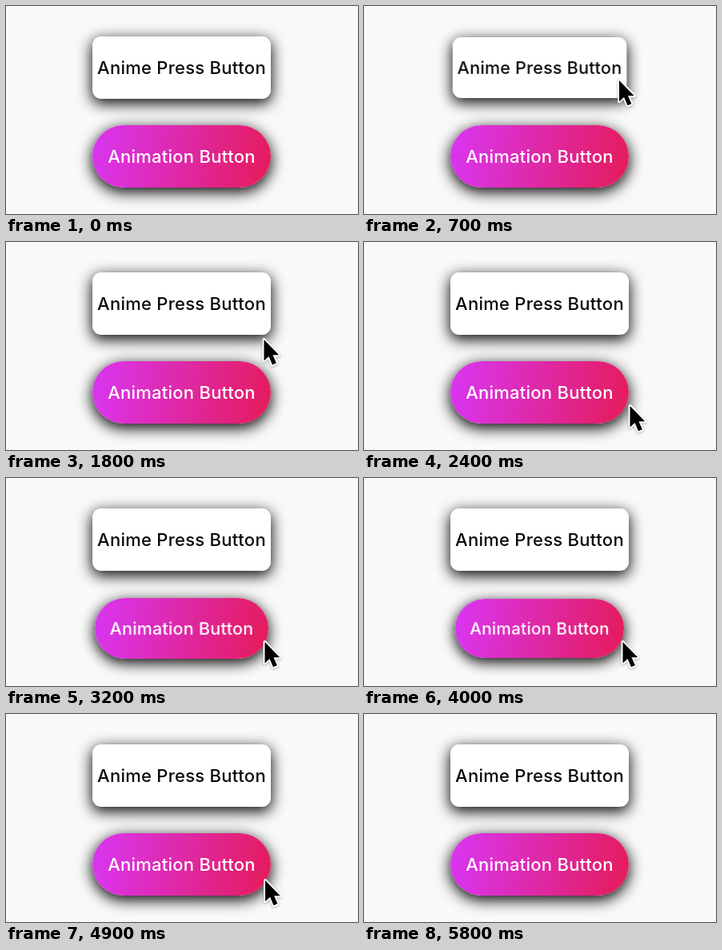
Recreate the animation shown at these times as an HTML page. Size 440 by 260 pixels, loop 6.1 s.

```html
<!DOCTYPE html>
<html lang="en">
<head>
<meta charset="utf-8">
<title>Press buttons</title>
<style>
html, body { margin: 0; width: 100%; height: 100%; overflow: hidden; background: #f9f9f9; }
.button {
  position: absolute; left: 107.5px; width: 223px; height: 78px;
  font: 500 22px/78px Inter, Roboto, sans-serif; letter-spacing: .25px;
  text-align: center; white-space: nowrap;
  box-shadow: 0 5px 18px 1px rgba(0, 0, 0, .95);
  will-change: transform;
}
#plain { top: 37.5px; border-radius: 11px; background: #fff; color: #0a0a0a; }
#pill {
  top: 148.5px; border-radius: 39px; color: #fff;
  background: linear-gradient(100deg, #d936f4, #e51b59);
}
#cursor { position: absolute; left: 0; top: 0; overflow: visible; filter: drop-shadow(0 1px 1.5px rgba(0, 0, 0, .3)); }
#cursor path { stroke: #fff; stroke-width: 3.6; stroke-linejoin: round; paint-order: stroke; }
</style>
</head>
<body>
<div class="button" id="plain">Anime Press Button</div>
<div class="button" id="pill">Animation Button</div>
<svg id="cursor" width="20" height="32"><path transform="scale(1.1)" d="M0 0V24L5.5 19 9.5 28.5 14 26.5 10 17.5H17Z"/></svg>
<script>
const LOOP = 6100, STEP = 100;
const plain = document.getElementById("plain");
const pill = document.getElementById("pill");
const cursor = document.getElementById("cursor");

// Cursor stops: time, x, y
const stops = [
  [100, 370, 72], [500, 319, 93],
  [1600, 319, 93], [2200, 332.5, 205],
  [2400, 332.5, 205], [2600, 323.5, 205],
  [4800, 323.5, 205], [5200, 327, 224]
];

const ease = p => p * p * (3 - 2 * p);

function place(t) {
  const i = stops.findIndex(s => t < s[0]);
  if (i < 1) return null;
  const [a, b] = [stops[i - 1], stops[i]];
  const p = ease((t - a[0]) / (b[0] - a[0]));
  return [a[1] + (b[1] - a[1]) * p, a[2] + (b[2] - a[2]) * p];
}

// Scale during a run of equal presses
function press(t, start, length, count, depth) {
  const n = (t - start) / length;
  return n > 0 && n < count ? 1 - depth * Math.sin(Math.PI * (n % 1)) : 1;
}

function draw(now) {
  const t = Math.floor(now % LOOP / STEP) * STEP;
  plain.style.transform = `scale(${press(t, 650, 640, 1, .1)})`;
  pill.style.transform = `scale(${press(t, 2780, 500, 4, .055)})`;
  const at = place(t);
  cursor.style.display = at ? "block" : "none";
  if (at) cursor.style.transform = `translate(${at[0]}px, ${at[1]}px)`;
}

const begin = performance.now();
function frame() {
  draw(performance.now() - begin);
  requestAnimationFrame(frame);
}
frame();
</script>
</body>
</html>
```
